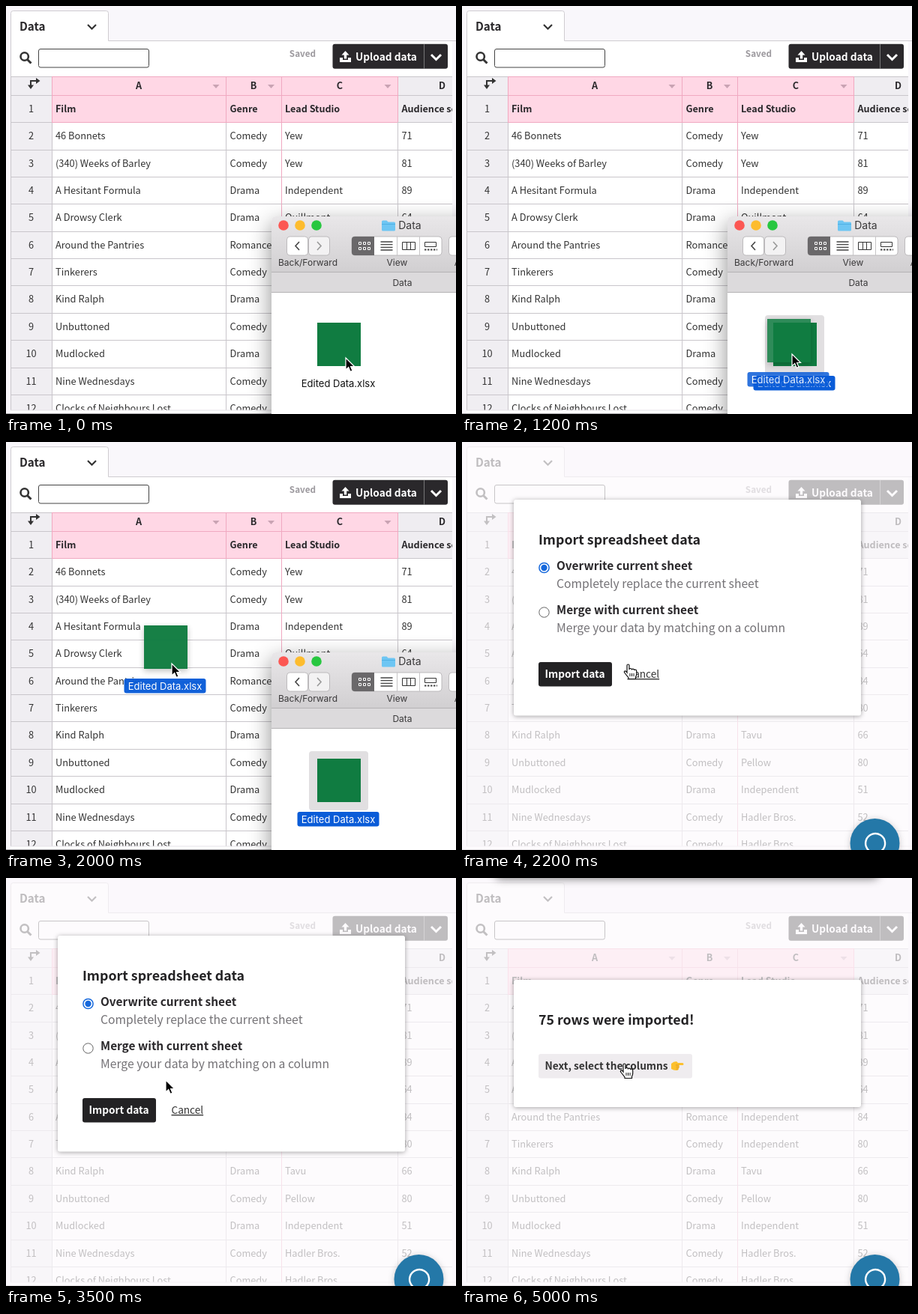
These frames come from a looping animation (600 px wide and 545 px high, 5200 ms). An HTML page:

```html
<!DOCTYPE html>
<html lang="en">
<head>
<meta charset="utf-8">
<title>Import spreadsheet data</title>
<style>
html, body { margin: 0; width: 100%; height: 100%; overflow: hidden; background: #f9f7fb; }
svg { display: block; width: 600px; height: 545px; }
text {
  font-family: "Noto Sans CJK JP", "Noto Sans CJK SC", "Noto Sans CJK", "Noto Sans", sans-serif;
  font-size: 12.8px; fill: #333; white-space: pre;
}
.b { font-weight: 700; font-size: 12.6px; fill: #2a282b; }
.mid { text-anchor: middle; }
.btn { font-weight: 700; font-size: 13.7px; }
.h1 { font-weight: 700; font-size: 17.8px; fill: #232224; }
.opt { font-weight: 700; font-size: 15.4px; fill: #2a282b; }
.sub { font-size: 15.7px; fill: #737175; }
.note { font-weight: 700; font-size: 11.7px; fill: #9c999e; text-anchor: end; }
.mac { font-family: Inter, "Liberation Sans", sans-serif; font-size: 12px; fill: #3a393a; text-anchor: middle; }
.file { font-size: 13px; fill: #111; }
.white { fill: #fff; }
.line { fill: none; stroke: #333; }
.modal { filter: drop-shadow(0 1px 3px rgba(0, 0, 0, .35)); }

/* One loop is 5200 ms; the picture changes on 100 ms beats. */
.a { animation: 5.2s step-end infinite; }
#cursor { animation-name: cursor; }
#arrow { animation-name: arrow; }
#hand { animation-name: hand; }
#ghost { animation-name: ghost; }
#ghost .lift { filter: drop-shadow(0 3px 4px rgba(0, 0, 0, .25)); }
#ghostFade { animation-name: ghostFade; }
#picked { animation-name: picked; }
#finder { animation-name: finder; filter: drop-shadow(0 10px 15px rgba(0, 0, 0, .45)); }
#veil, #askFade { animation-name: veil; }
#ask { animation-name: ask; }
#done { animation-name: done; }
#topShade { animation-name: topShade; }
#saved { animation-name: saved; }
#saving { animation-name: saving; }

@keyframes cursor {
  0% { transform: translate(453px, 470px); animation-timing-function: steps(6); }
  11.538%, 17.307% { transform: translate(451px, 472px); animation-timing-function: steps(3); }
  23.076% { transform: translate(440px, 465px); animation-timing-function: steps(2); }
  26.923% { transform: translate(231px, 331px); animation-timing-function: steps(4); }
  34.615% { transform: translate(222px, 299px); animation-timing-function: steps(2); }
  38.461% { transform: translate(221px, 296px); animation-timing-function: steps(2); }
  42.307%, 55.769% { transform: translate(222px, 297px); animation-timing-function: steps(3); }
  61.538% { transform: translate(312px, 180px); animation-timing-function: steps(3); }
  67.307% { transform: translate(213px, 270px); animation-timing-function: steps(2); }
  71.153%, 88.461% { transform: translate(178px, 299px); animation-timing-function: steps(4); }
  96.153%, 100% { transform: translate(217px, 248px); }
}
@keyframes hand {
  0%, 57.692%, 76.923% { opacity: 0; }
  42.307%, 71.153%, 94.23%, 100% { opacity: 1; }
}
@keyframes arrow {
  0%, 57.692%, 76.923% { opacity: 1; }
  42.307%, 71.153%, 94.23%, 100% { opacity: 0; }
}
@keyframes ghost {
  0%, 17.307% { transform: translate(0, 0); animation-timing-function: steps(3); }
  23.076% { transform: translate(-8px, -5px); animation-timing-function: steps(2); }
  26.923% { transform: translate(-219px, -135px); animation-timing-function: steps(4); }
  34.615% { transform: translate(-230px, -175px); animation-timing-function: steps(2); }
  38.461%, 100% { transform: translate(-231px, -178px); }
}
@keyframes ghostFade {
  0% { opacity: 0; }
  19.23% { opacity: .85; }
  30.769% { opacity: .97; }
  40.384%, 100% { opacity: 0; }
}
@keyframes picked { 0% { opacity: 0; } 13.461%, 100% { opacity: 1; } }
@keyframes finder { 0% { opacity: 1; } 40.384%, 100% { opacity: 0; } }
@keyframes veil { 0% { opacity: 0; } 40.384% { opacity: .5; } 42.307%, 100% { opacity: 1; } }
@keyframes ask {
  0%, 73.076% { transform: translateY(0); animation-timing-function: steps(4); }
  80.769%, 100% { transform: translateY(-374px); }
}
@keyframes done { 0% { opacity: 0; } 76.923% { opacity: .35; } 78.846% { opacity: .8; } 80.769%, 100% { opacity: 1; } }
@keyframes topShade { 0% { opacity: 0; } 80.769%, 100% { opacity: 1; } }
@keyframes saved { 0% { opacity: 1; } 76.923% { opacity: 0; } 84.615% { opacity: .5; } 86.538%, 100% { opacity: 1; } }
@keyframes saving { 0%, 84.615%, 100% { opacity: 0; } 76.923% { opacity: 1; } }
</style>
</head>
<body>
<svg viewBox="0 0 600 545">
  <defs>
    <clipPath id="tableClip"><rect x="5" y="94" width="590" height="446"/></clipPath>
    <linearGradient id="chrome" x2="0" y2="1">
      <stop offset="0" stop-color="#e9e7e9"/><stop offset="1" stop-color="#d1cfd1"/>
    </linearGradient>
    <filter id="soft" x="-10%" y="-100%" width="120%" height="300%"><feGaussianBlur stdDeviation="6"/></filter>
    <rect id="sheetIcon" x="415" y="423" width="58" height="58" fill="#107c41"/>
    <g id="pill">
      <rect x="388.5" y="494" width="109" height="19.500" rx="3" fill="#0a5cd8"/>
      <text class="mac file white" x="443" y="508.5">Edited Data.xlsx</text>
    </g>
  </defs>

  <!-- editor -->
  <rect width="600" height="545" fill="#f9f7fb"/>
  <rect x="6" y="46" width="589" height="499" fill="#fff"/>
  <path d="M6.500 94V9.500Q6.500 6.500 9.500 6.500H133.500Q136.500 6.500 136.500 9.500V46.500H595V94Z" fill="#fff"/>
  <path d="M6.500 94V9.500Q6.500 6.500 9.500 6.500H133.500Q136.500 6.500 136.500 9.500V46.500H600" fill="none" stroke="#cfccd1"/>
  <text x="18" y="33" class="b" style="font-size:15.2px">Data</text>
  <path class="line" stroke-width="2.2" d="M109 25l5.500 5.500 5.500-5.500"/>
  <circle class="line" cx="24.700" cy="67.500" r="5.200" stroke-width="2.600"/>
  <path class="line" stroke-width="3" d="M28.500 71.500l5 5"/>
  <rect x="43.500" y="57.500" width="147" height="24.500" rx="2.500" fill="#fff" stroke="#444"/>
  <text id="saved" class="a note" x="413" y="68">Saved</text>
  <text id="saving" class="a note" x="413" y="68">Saving</text>
  <rect x="435.500" y="50.700" width="153.500" height="33" rx="3" fill="#2a282b"/>
  <path d="M557.500 51V84" stroke="#777"/>
  <path d="M452.500 60l5 5.500h-3.300v5h-3.400v-5h-3.300zM445 69h4v3h7v-3h4v6h-15z" fill="#fff"/>
  <text class="btn white" x="466" y="73">Upload data</text>
  <path d="M567 65l6.500 6.500 6.500-6.500" fill="none" stroke="#fff" stroke-width="3"/>

  <g id="table" clip-path="url(#tableClip)"></g>
  <path class="line" stroke-width="2" d="M33 107V100H41"/>
  <path d="M29 105.500h8l-4 5.500zM40 96v8l5.500-4z" fill="#333"/>
  <path d="M6 540H600" stroke="#e4e1e6"/>
  <path d="M0 544.500H600" stroke="#a9a7ab"/>

  <rect id="veil" class="a" width="600" height="545" fill="#fdf9fd" fill-opacity=".71"/>

  <!-- dialogs -->
  <rect id="topShade" class="a" x="44" y="-22" width="512" height="23" rx="8" fill-opacity=".5" filter="url(#soft)"/>
  <g id="ask" class="a"><g id="askFade" class="a">
    <rect class="modal" x="69" y="77" width="463" height="288.500" rx="3" fill="#fff"/>
    <text class="h1" x="102" y="136.500">Import spreadsheet data</text>
    <circle cx="109.500" cy="168" r="6.600" fill="#fff" stroke="#1668dc" stroke-width="1.500"/>
    <circle cx="109.500" cy="168" r="4.200" fill="#1668dc"/>
    <text class="opt" x="126" y="170.500">Overwrite current sheet</text>
    <text class="sub" x="126" y="194.500">Completely replace the current sheet</text>
    <circle cx="109.500" cy="227.500" r="6.700" fill="#fff" stroke="#666"/>
    <text class="opt" x="126" y="230">Merge with current sheet</text>
    <text class="sub" x="126" y="254">Merge your data by matching on a column</text>
    <rect x="102" y="294" width="98" height="32.500" rx="3" fill="#232224"/>
    <text class="btn white" x="110.500" y="315">Import data</text>
    <text x="220.500" y="315" text-decoration="underline" style="font-size:13.6px">Cancel</text>
  </g></g>
  <g id="done" class="a">
    <rect class="modal" x="69" y="136" width="463" height="170" rx="3" fill="#fff"/>
    <text class="h1" x="102" y="196">75 rows were imported!</text>
    <rect x="102" y="235" width="205" height="32.500" rx="3" fill="#efecef"/>
    <text class="btn" x="110.500" y="255.500">Next, select the columns</text>
    <path d="M279 248q3-3 7-3l2 2h6q1.500 0 1.500 1.500t-1.500 1.500h-5q1.500 1 .5 2.500 .5 1-.7 2 0 2.500-3 2.500-4 0-6.800-2z" fill="#fcc02e"/>
    <path d="M285 250h4.500M285.500 252.600h4M285.500 255h3" stroke="#d98f1f" stroke-width=".8"/>
  </g>

  <!-- chat button -->
  <g style="filter:drop-shadow(0 1px 4px rgba(0,0,0,.2))"><circle cx="550.500" cy="536" r="33" fill="#2478a8"/></g>
  <path d="M560 545.500A13 13 0 1 0 550.500 549H563Q560.500 548 560 545.500Z" fill="none" stroke="#fff" stroke-width="2.400"/>

  <!-- file window -->
  <g id="finder" class="a">
    <path d="M354 600V287Q354 281 360 281H660V600Z" fill="#fff"/>
    <path d="M354 355V287Q354 281 360 281H660V355Z" fill="url(#chrome)"/>
    <rect x="354" y="355" width="306" height="28" fill="#dcdadc"/>
    <path d="M354 355.500H600M354 382.500H600" stroke="#b5b3b5"/>
    <circle cx="370" cy="293" r="6.800" fill="#fc5753"/>
    <circle cx="392" cy="293" r="6.800" fill="#fdbc2e"/>
    <circle cx="414" cy="293" r="6.800" fill="#28c740"/>
    <path d="M501 288q0-1.500 1.500-1.500h5l2 2h8q1.500 0 1.500 1.500v9q0 1.500-1.500 1.500h-15q-1.500 0-1.500-1.500z" fill="#6ec6f3"/>
    <path d="M501 291.500H519" stroke="#4fb0e4"/>
    <text class="mac" x="538.500" y="298" style="font-size:14px">Data</text>
    <g stroke="#b0aeb0" stroke-width=".8">
      <rect x="374.500" y="308" width="28" height="25" rx="4" fill="#fff"/>
      <rect x="403.500" y="308" width="28" height="25" rx="4" fill="#f3f2f3"/>
      <rect x="461" y="308" width="120" height="25" rx="4" fill="#fff"/>
      <rect x="590.500" y="308" width="30" height="25" rx="4" fill="#fff"/>
    </g>
    <path d="M391 315l-5 5.500 5 5.500" fill="none" stroke="#444" stroke-width="1.600"/>
    <path d="M415 315l5 5.500-5 5.500" fill="none" stroke="#999" stroke-width="1.600"/>
    <text class="mac" x="402.500" y="346.500">Back/Forward</text>
    <path d="M491 308V333H465Q461 333 461 329V312Q461 308 465 308Z" fill="#6a686a"/>
    <path d="M521.500 308V333M551.500 308V333" stroke="#c6c4c6"/>
    <path d="M470.500 315.500h3v3h-3zm6 0h3v3h-3zm6 0h3v3h-3zM470.500 322.500h3v3h-3zm6 0h3v3h-3zm6 0h3v3h-3z" fill="none" stroke="#fff"/>
    <path d="M499.500 315H515.500M499.500 318.700H515.500M499.500 322.400H515.500M499.500 326H515.500" stroke="#444" stroke-width="1.300"/>
    <path class="line" d="M528.500 315.500h17v10h-17zM534.500 315.500v10M539.500 315.500v10"/>
    <path class="line" d="M558.500 315.500h15v6h-15z"/>
    <path d="M558 325.500H575" stroke="#444" stroke-width="2" stroke-dasharray="2.500 1.500"/>
    <text class="mac" x="521.500" y="346.500">View</text>
    <text class="mac" x="602" y="346.500">A</text>
    <text class="mac" x="528.500" y="373.500">Data</text>
    <text class="mac file" x="443" y="508.500">Edited Data.xlsx</text>
    <g id="picked" class="a">
      <rect x="404" y="413" width="79" height="79" rx="4" fill="#e1dfe1"/>
      <use href="#pill"/>
    </g>
    <use href="#sheetIcon"/>
  </g>

  <g id="ghost" class="a"><g id="ghostFade" class="a">
    <use class="lift" href="#sheetIcon"/><use href="#pill"/>
  </g></g>

  <g id="cursor" class="a">
    <path id="arrow" class="a" d="M0 0V16L3.700 12.600 6.200 18.400 9 17.200 6.600 11.500H11.500Z" stroke="#fff" stroke-width="1.200"/>
    <g id="hand" class="a">
      <path d="M-2 8V1.500Q-2 0-.5 0T1 1.500V7Q1 5.500 2.700 5.500T4.400 7.500Q4.400 6 6 6.200T7.600 8Q7.600 7 9.200 7.200T10.700 9V13Q10.700 15 9.500 17V19.500H0V18L-5 11.500Q-6.300 9.500-5 9T-2 11Z" fill="#fff" stroke="#111" stroke-width="1.200"/>
      <path d="M2 12v4M4.500 12v4M7 12v4" stroke="#111"/>
    </g>
  </g>
</svg>
<script>
const table = document.getElementById('table');
const add = (tag, attrs, text = '') => {
  const el = document.createElementNS('http://www.w3.org/2000/svg', tag);
  for (const key in attrs) el.setAttribute(key, attrs[key]);
  el.textContent = text;
  table.append(el);
};
const rect = (x, y, width, height, fill) => add('rect', { x, y, width, height, fill });
const path = (d, stroke) => add('path', { d, stroke });
const label = (x, y, text, cls = '') => add('text', { x, y, class: cls }, text);

const STEP = 36.35, GREY = '#c9c6cb', PINK = '#f0a9c1';
const cols = [66, 298.5, 372, 527.5];
const rows = [
  'Film|Genre|Lead Studio|Audience score',
  '46 Bonnets|Comedy|Yew|71',
  '(340) Weeks of Barley|Comedy|Yew|81',
  'A Hesitant Formula|Drama|Independent|89',
  'A Drowsy Clerk|Drama|Quillmont|64',
  'Around the Pantries|Romance|Independent|84',
  'Tinkerers|Comedy|Independent|80',
  'Kind Ralph|Drama|Tavu|66',
  'Unbuttoned|Comedy|Pellow|80',
  'Mudlocked|Drama|Independent|51',
  'Nine Wednesdays|Comedy|Hadler Bros.|52',
  'Clocks of Neighbours Lost|Comedy|Hadler Bros.|',
];

rect(6, 94, 55, 451, '#f0eef2');
rect(61, 94, 461.5, 61.5, '#ffd7e5');
rect(522.5, 94, 72.5, 61.5, '#efedf1');

rows.forEach((row, i) => {
  const y = 142 + i * STEP, edge = Math.round(119 + i * STEP) + .5;
  path(`M6 ${edge}H595`, GREY);
  label(33.5, y, i + 1, 'mid');
  row.split('|').forEach((cell, c) => label(cols[c], y, cell, i ? '' : 'b'));
});

path('M6 94.5H595M6.5 94V545M61.5 155V545M293.5 155V545M522.5 94V545', GREY);
path('M61 94.5H522M61 119.5H522M61 155.5H522M61.5 94V155M293.5 94V155M367.5 94V545M522.5 94V155', PINK);
[[177, 'A'], [330, 'B'], [445, 'C'], [581.5, 'D']].forEach(([x, t]) => label(x, 111, t, 'b mid'));
for (const x of [280, 353.5, 509]) add('path', { d: `M${x - 4.5} 105h9l-4.500 5z`, fill: '#c9a3b3' });
</script>
</body>
</html>
```
